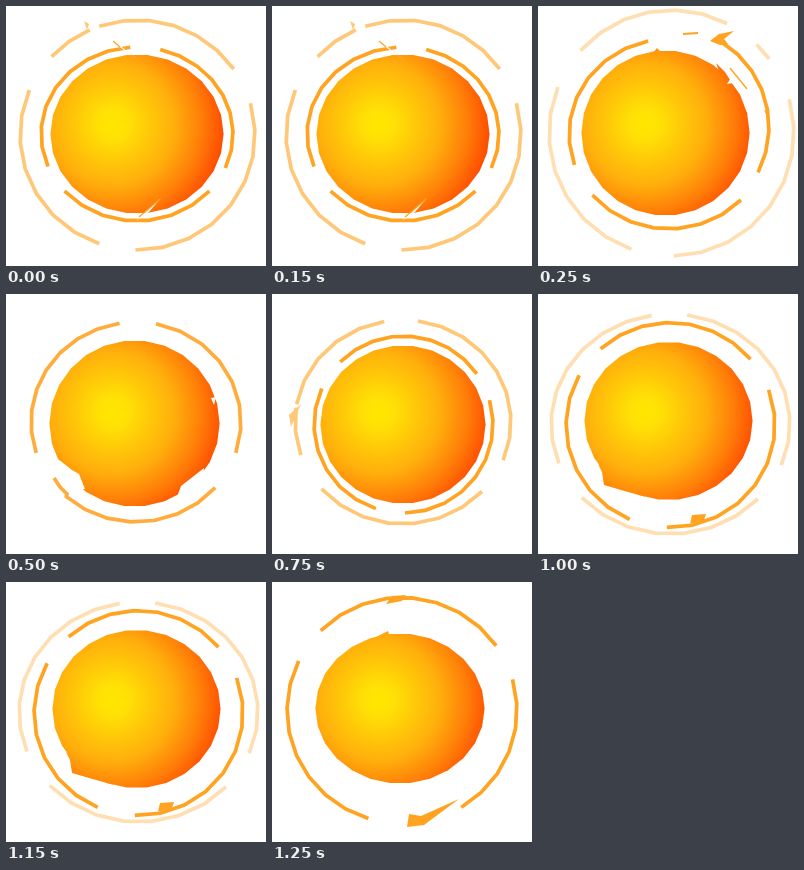
An HTML page with a canvas for the animation above (1.5 s loop, 260 px wide and 260 px high).

```html
<!DOCTYPE html>
<html lang="en">
<head>
<meta charset="utf-8">
<title>Wobbling sun</title>
<style>
html, body { margin: 0; width: 100%; height: 100%; overflow: hidden; background: #fff; }
canvas { display: block; }
</style>
</head>
<body>
<canvas id="stage" width="260" height="260"></canvas>
<script>
const ctx = document.getElementById('stage').getContext('2d');
const strong = '#ffa321', warm = '#ffac3c', mid = '#ffc878', pale = '#ffdfb2', white = '#fff';

const glow = ctx.createRadialGradient(107, 118, 0, 107, 118, 112);
[[0, '#ffe600'], [.12, '#ffe205'], [.55, '#ffae0c'], [.8, '#ff7c08'], [1, '#ff4a00']]
  .forEach(([at, color]) => glow.addColorStop(at, color));

// Elliptic arc drawn as short straight strokes; angles in degrees, clockwise.
function bend(cx, cy, rx, ry, from, to) {
  const steps = Math.ceil((to - from) / 14);
  ctx.beginPath();
  for (let i = 0; i <= steps; i++) {
    const a = (from + (to - from) * i / steps) * Math.PI / 180;
    ctx.lineTo(cx + rx * Math.cos(a), cy + ry * Math.sin(a));
  }
}

function sun(cx, cy, rx, ry) {
  bend(cx, cy, rx + .6, ry + .6, 0, 360);
  ctx.fillStyle = glow;
  ctx.fill();
}

function ring(color, cx, cy, rx, ry, ...spans) {
  ctx.strokeStyle = color;
  ctx.lineWidth = 3.7;
  for (let i = 0; i < spans.length; i += 2) {
    bend(cx, cy, rx, ry, spans[i], spans[i + 1]);
    ctx.stroke();
  }
}

function patch(color, d) {
  ctx.fillStyle = color;
  ctx.fill(new Path2D(d));
}

function line(color, width, d) {
  ctx.strokeStyle = color;
  ctx.lineWidth = width;
  ctx.stroke(new Path2D(d));
}

const poses = [
  () => {
    sun(131, 128, 86, 79);
    ring(mid, 131.5, 129, 117.5, 115, 223, 246, 251, 325, 344, 451, 109, 203);
    ring(strong, 131, 128, 96, 87, 158, 266, 284, 383, 41, 139);
    patch(mid, 'M78 15L83 18 81 24');
    patch(white, 'M104 34L112 38 132 54M130 215L155 192 143 206');
    line(strong, 1.2, 'M107 35L114 41M125 49L131 53M133 211L154 193');
  },
  () => {
    sun(127.5, 127, 83.5, 82);
    ring(pale, 133.5, 127, 122.5, 123, 222, 297, 314, 323, 344, 449, 109, 202);
    ring(strong, 131, 128, 100, 95, 161, 258, 44, 140);
    ring(strong, 131, 121, 100, 100, 301, 387);
    patch(strong, 'M196 25L181 28 172 35 182 39 190 38 186 33M145 27L160 26 160 28 145 29');
    patch(glow, 'M114 48L119 42 124 47M178 57L187 66 194 77 185 76');
    patch(white, 'M189 78L196 77 194 70');
    line(strong, 1.4, 'M192 62L209 83M227 104L229 109');
  },
  () => {
    sun(128.5, 129.5, 84.5, 82.5);
    ring(warm, 130, 128, 105, 100, 162, 261, 281, 378, 41, 132);
    line(warm, 3.7, 'M48 184L54 193 61 200 60 204');
    patch(white, 'M52 165L66 176 73 180 79 195 60 195M198 174L175 192 171 203 195 200M205 104L210 103 208 111');
  },
  () => {
    sun(131, 130.5, 82, 78.5);
    ring(mid, 131, 128, 108, 102, 161, 188, 190, 260, 278, 382, 43, 139);
    ring(strong, 131.5, 130.5, 89.5, 88.5, 225, 325, 344, 449, 108, 204);
    patch(mid, 'M29 110L19 133 17 121');
  },
  () => {
    sun(130.5, 127, 83.5, 78.5);
    ring(pale, 132.5, 130, 119.5, 110, 159, 261, 278, 382, 43, 138);
    ring(strong, 132.5, 131, 104.5, 102.5, 228, 320, 340, 452, 113, 209);
    patch(glow, 'M60 170L64 178 66 191 83 196 108 203');
    patch(strong, 'M154 221L168 220 166 226 152 230');
  },
  () => {
    sun(128, 126.5, 84, 74.5);
    ring(strong, 130, 128.5, 115, 113, 225, 325, 344, 419, 107, 206);
    patch(glow, 'M102 56L116 49 118 56');
    patch(strong, 'M114 22L120 14 134 13 130 19M137 232L149 234 187 217 152 243 135 245');
  }
];

const start = performance.now();

function draw() {
  ctx.fillStyle = white;
  ctx.fillRect(0, 0, 260, 260);
  poses[Math.floor((performance.now() - start) / 250) % poses.length]();
  requestAnimationFrame(draw);
}
draw();
</script>
</body>
</html>
```
